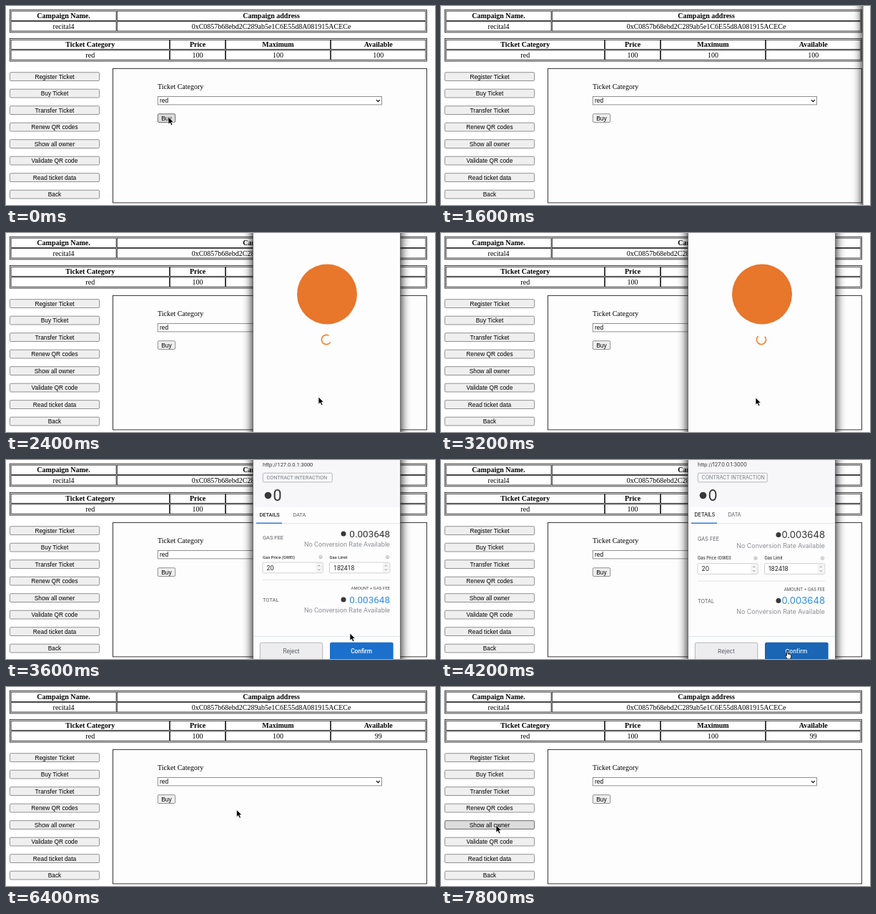
Recreate the animation shown at these times as an HTML page. Size 600x278 px, loop 8000 ms.

```html
<!DOCTYPE html>
<html lang="en">
<head>
<meta charset="utf-8">
<title>Ticket purchase</title>
<style>
html, body { margin: 0; width: 100%; height: 100%; overflow: hidden; background: #fff; }
svg { display: block; width: 100%; height: 100%; }
.page { font: 10px "Liberation Serif", serif; }
.ui { font: 8.35px "Liberation Sans", sans-serif; }
#form { font: 10px Roboto, sans-serif; }
#form.loaded { font: 9.7px Inter, sans-serif; }
#form.loaded .details { transform: translateY(1.6px); }
</style>
</head>
<body>
<svg viewBox="0 0 600 278" preserveAspectRatio="none">
  <defs>
    <filter id="blur" x="-30%" y="-30%" width="160%" height="160%"><feGaussianBlur stdDeviation="7"/></filter>
  </defs>
  <g id="page"></g>
  <g id="popup">
    <rect x="345" y="-40" width="207" height="360" fill="#000" filter="url(#blur)"/>
    <rect x="345.7" y="-5" width="205.6" height="290" fill="#fefdfe" stroke="#555" stroke-width=".6"/>
    <g id="loading">
      <circle cx="449" cy="85.5" r="42" fill="#e8762b"/>
      <circle id="spinner" cx="448" cy="149" r="6.6" fill="none" stroke="#f0862f" stroke-width="1.7" stroke-dasharray="31 10.5"/>
    </g>
    <g id="form"></g>
  </g>
  <path id="arrow" d="M0 0V10.2L2.4 8 4 11.7 5.9 10.9 4.3 7.3H7.4Z" fill="#000" stroke="#fff" stroke-width=".7"/>
  <path id="hand" d="M1.5 1Q2.5 -.4 3.2 1V4Q7.6 4 7.7 5.8V8L6.7 11H2.6L-.6 6.8Q-.4 5.2 1.5 6.6Z" fill="#fff" stroke="#000" stroke-width=".8"/>
</svg>
<script>
const $ = id => document.getElementById(id);
const LOOP = 8000, STEP = 200;

const text = (x, y, value, attrs = "") => `<text x="${x}" y="${y}" ${attrs}>${value}</text>`;
const middle = 'text-anchor="middle"';
const rect = (x, y, w, h, attrs) => `<rect x="${x}" y="${y}" width="${w}" height="${h}" ${attrs}/>`;

// Page: two tables, the menu and the purchase panel
function table(top, columns, rows) {
  const line = 'fill="none" stroke="#000" stroke-width=".75"';
  let out = rect(5.4, top, 583.2, 31.7, line);
  rows.forEach((row, r) => row.forEach((value, c) => {
    const x = columns[c] + .6, w = columns[c + 1] - columns[c] - 1.2, y = top + 1.9 + r * 14.6;
    const id = value === "available" ? 'id="available"' : "";
    out += rect(x, y, w, 13.3, line) +
      text(x + w / 2, y + 10.1, value, `${id} ${middle} ${r ? "" : 'font-weight="700"'}`);
  }));
  return out;
}

const labels = ["Register Ticket", "Buy Ticket", "Transfer Ticket", "Renew QR codes",
  "Show all owner", "Validate QR code", "Read ticket data", "Back"];
const buttons = labels.map((label, i) => ({ label, x: 5.4, y: 92.7 + i * 23.5, w: 125.2, h: 11.8 }));
buttons.push({ label: "Buy", x: 212.3, y: 150.7, w: 24.4, h: 11.8 });

$("page").innerHTML = `<g class="page">` +
  table(5.2, [6.5, 154.7, 587.5], [
    ["Campaign Name.", "Campaign address"],
    ["recital4", "0xC0857b68ebd2C289ab5e1C6E55d8A081915ACECe"]]) +
  table(45.4, [6.5, 229, 307, 454, 587.5], [
    ["Ticket Category", "Price", "Maximum", "Available"],
    ["red", "100", "100", "available"]]) +
  rect(149.5, 87.4, 439, 187.5, 'fill="#fefdfe" stroke="#222" stroke-width=".9"') +
  text(212, 116, "Ticket Category") + `</g><g class="ui">` +
  rect(212.3, 126.5, 313.2, 11.4, 'fill="#fff" stroke="#767676" stroke-width=".8"') +
  text(215, 135.2, "red") +
  '<path d="M518 131.2l2.4 2.4 2.4-2.4" fill="none" stroke="#000" stroke-width="1.2"/>' +
  buttons.map(b => rect(b.x, b.y, b.w, b.h, 'class="button" rx="1.6" stroke-width=".8"') +
    text(b.x + b.w / 2, b.y + 8.8, b.label, middle)).join("") + "</g>";

// Popup form; sizes are relative so that both fonts share one layout
const label = (x, y, size, color, value, attrs = "") =>
  text(x, y, value, `style="font-size:${size}em" fill="${color}" ${attrs}`);
const end = 'text-anchor="end"';
const rule = (x1, x2, y, color, width = .7) =>
  `<path d="M${x1} ${y}H${x2}" stroke="${color}" stroke-width="${width}"/>`;
const dot = (x, y, r) => `<circle cx="${x}" cy="${y}" r="${r}" fill="#383838"/>`;
const fee = (y, color) => dot(472, y - 4.8, 3.5) + label(537, y, 1.35, color, "0.003648", end) +
  label(537, y + 13.3, .92, "#8c8e94", "No Conversion Rate Available", end);
const field = (x, name, value) => label(x, 137.7, .59, "#333", name, 'font-weight="500"') +
  `<circle cx="${x + 81}" cy="135.6" r="2.2" fill="none" stroke="#999" stroke-width=".7"/>` +
  rule(x + 80.4, x + 81.6, 135.8, "#999", 1.6) +
  rect(x, 143, 84.3, 14.8, 'rx="1.5" fill="#fff" stroke="#c3c7ca" stroke-width=".8"') +
  label(x + 5.6, 153.8, .87, "#222", value) +
  rect(x + 75, 144.5, 7.5, 11.8, 'rx="1" fill="#f7f7f7" stroke="#ddd" stroke-width=".5"') +
  `<path d="M${x + 77.3} 148.6l1.5-1.7 1.5 1.7m-3 3.8l1.5 1.7 1.5-1.7" fill="none" stroke="#666" stroke-width=".7"/>`;

$("form").innerHTML =
  rect(346, -5, 205, 71, 'fill="#f7f7f9"') +
  label(359, 9, .75, "#333", "http://127.0.0.1:3000") +
  rect(359.3, 18.3, 97, 12.6, 'rx="1.5" fill="none" stroke="#a5a7ab" stroke-width=".8"') +
  label(364.6, 27.2, .725, "#7b7d83", "CONTRACT INTERACTION") +
  dot(366.5, 49.5, 4.8) + label(373.5, 56.6, 2.15, "#333", "0") +
  rule(346, 551, 88.6, "#d8dadc") + rule(350, 386, 88.3, "#2f7fd0", 1.4) +
  label(354.5, 79, .73, "#222", "DETAILS", 'font-weight="500"') +
  label(401.5, 79, .73, "#5b5d67", "DATA") +
  '<g class="details">' +
  label(359, 111.2, .75, "#5b5d67", "GAS FEE") + fee(107.8, "#333") +
  field(359, "Gas Price (GWEI)", "20") + field(452.5, "Gas Limit", "182418") +
  rule(359, 537, 167.5, "#d2d8dd") +
  label(537, 181.2, .6, "#444", "AMOUNT + GAS FEE", end) +
  label(359, 198, .75, "#5b5d67", "TOTAL") + fee(199.8, "#2f8fe8") +
  "</g>" +
  rule(346, 551, 246.3, "#d2d8dd") +
  rect(355.3, 255.2, 87.5, 30, 'rx="2.5" fill="#ededef" stroke="#a3a6aa" stroke-width=".8"') +
  label(399, 270.3, .84, "#5b5d67", "Reject", middle) +
  rect(453, 254.8, 88.7, 30, 'id="confirm" rx="2.5"') +
  label(497, 270.3, .83, "#fff", "Confirm", middle + ' font-weight="500"');

// Pointer path: time, x, y; above the stage while the window is dragged
const OFF = -20;
const pointerPath = [
  [0, 227, 155], [400, 227, 155], [600, 450, OFF], [2000, 450, OFF],
  [2400, 437, 229], [3200, 440, 230], [3600, 481, 242], [4000, 482, 266], [4200, 482, 267],
  [4800, 481, 267], [6000, 481, 267], [6200, 455, 248], [6600, 190, 95], [6800, 45, 18],
  [7000, 8, 50], [7200, 70, 137], [7400, 75, 175], [7600, 77, 199], [7800, 77, 193], [LOOP, 77, 193]
];

function pointerAt(t) {
  const i = pointerPath.findLastIndex(key => key[0] <= t);
  const a = pointerPath[i], b = pointerPath[i + 1];
  const k = (t - a[0]) / (b[0] - a[0]);
  return [a[1] + (b[1] - a[1]) * k, a[2] + (b[2] - a[2]) * k];
}

const show = (id, visible) => $(id).setAttribute("visibility", visible ? "inherit" : "hidden");
const buttonRects = document.querySelectorAll(".button");

function draw(now) {
  const t = Math.floor(now % LOOP / STEP) * STEP;
  const [x, y] = pointerAt(t);
  const popupOpen = t >= 600 && t < 4800;
  const formOpen = t >= 3400;
  const onConfirm = popupOpen && formOpen && y > 254;

  buttons.forEach((b, i) => {
    const hover = x >= b.x && x <= b.x + b.w && y >= b.y && y <= b.y + b.h;
    buttonRects[i].setAttribute("fill", hover ? "#dcdcdc" : "#efefef");
    buttonRects[i].setAttribute("stroke", hover ? "#4c4c4c" : "#767676");
  });
  $("available").textContent = t < 5400 ? "100" : "99";

  // The window is dragged in from beyond the right edge
  const slide = Math.min(1, Math.max(0, (t - 1500) / 600));
  const shift = 264 * (1 - slide * slide * (3 - 2 * slide));
  $("popup").setAttribute("transform", `translate(${shift} 0)`);
  show("popup", popupOpen);
  show("loading", !formOpen);
  show("form", formOpen);
  $("form").setAttribute("class", t >= 3800 ? "loaded" : "");
  $("spinner").setAttribute("transform", `rotate(${30 + (t - 2400) * .36} 448 149)`);
  $("confirm").setAttribute("fill", onConfirm ? "#1a66b5" : "#1b70cc");

  show("arrow", !onConfirm);
  show("hand", onConfirm);
  for (const id of ["arrow", "hand"]) $(id).setAttribute("transform", `translate(${x} ${y})`);
}

const start = performance.now();
function tick() {
  draw(performance.now() - start);
  requestAnimationFrame(tick);
}
tick();
</script>
</body>
</html>
```
